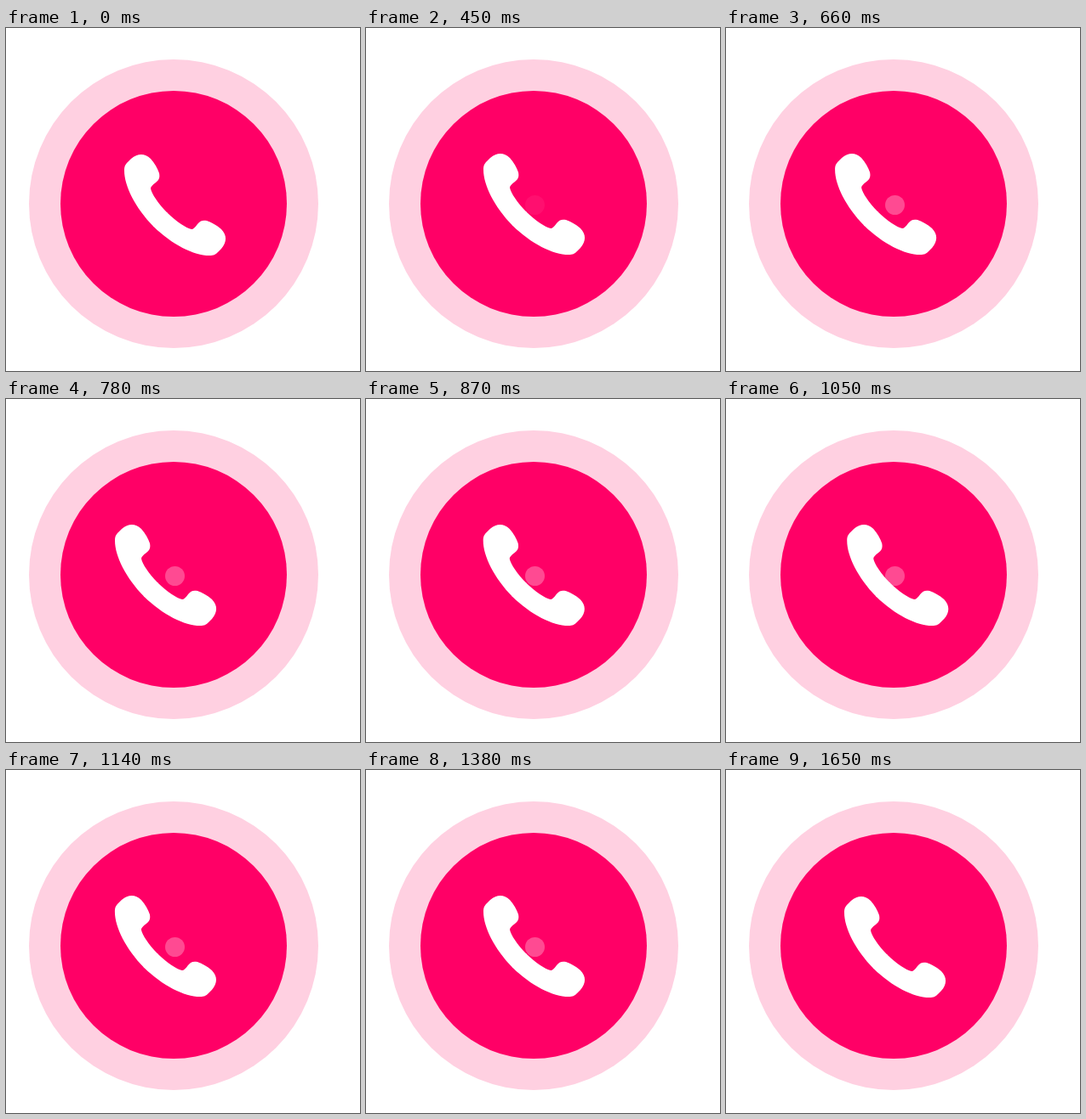
Animation of 416x404 px, one loop 2.4 s. Source, as an HTML page:

```html
<!DOCTYPE html>
<html lang="en">
<head>
<meta charset="utf-8">
<title>Ringing phone</title>
<style>
html, body { margin: 0; width: 100%; height: 100%; overflow: hidden; background: #fff; }
svg { display: block; }
</style>
</head>
<body>
<svg width="416" height="404" viewBox="0 0 416 404">
  <defs>
    <!-- One half of the handset; the other half is its mirror image across the diagonal -->
    <path id="half" d="M173.3 233.7C152 212 139 186 139 168C139 163 140 161 143 158L147 154
      C155 147.2 163 147.2 170 154C175 160 178 165 180 171C181 176 180 179 176 182
      C172 185 170 187 170 189C171 195 179 207 189.4 217.6Z"/>
  </defs>
  <circle cx="197" cy="207" r="170" fill="#ffd0e1"/>
  <circle cx="197" cy="207" r="133" fill="#ff0066"/>
  <g id="phone" fill="#fff">
    <use href="#half"/>
    <use href="#half" transform="matrix(0 -1 -1 0 407 407)"/>
    <path d="M172.8 233.2L188.9 217.1L189.9 218.1L173.8 234.2Z"/>
  </g>
  <circle id="dot" cx="198.5" cy="208.5" r="11.5" fill="#fff"/>
</svg>
<script>
const LOOP = 2400, STEP = 30;
const phone = document.getElementById('phone');
const dot = document.getElementById('dot');

// Linear 0..1 progress between two times
const ramp = (t, from, to) => Math.min(1, Math.max(0, (t - from) / (to - from)));

// A swing that slows down evenly, fading in and out
function shakeX(t) {
  const turns = 3.04 - 9e-6 * (1248 - t) ** 2;
  const size = 11 * ramp(t, 450, 600) * (1 - ramp(t, 1140, 1260));
  return -1 - size * Math.cos(2 * Math.PI * turns);
}

function dotAlpha(t) {
  const fade = t < 1560 ? 1 : t < 1650 ? 0.4 : 0;
  return 0.29 * ramp(t, 420, 570) * fade;
}

function draw(now) {
  const t = Math.floor(now % LOOP / STEP) * STEP;
  const lifted = t >= 210 && t < 1470;
  phone.setAttribute('transform', lifted ? `translate(${shakeX(t)} -1)` : '');
  dot.setAttribute('opacity', dotAlpha(t));
}

const start = performance.now();
function tick() {
  draw(performance.now() - start);
  requestAnimationFrame(tick);
}
tick();
</script>
</body>
</html>
```
